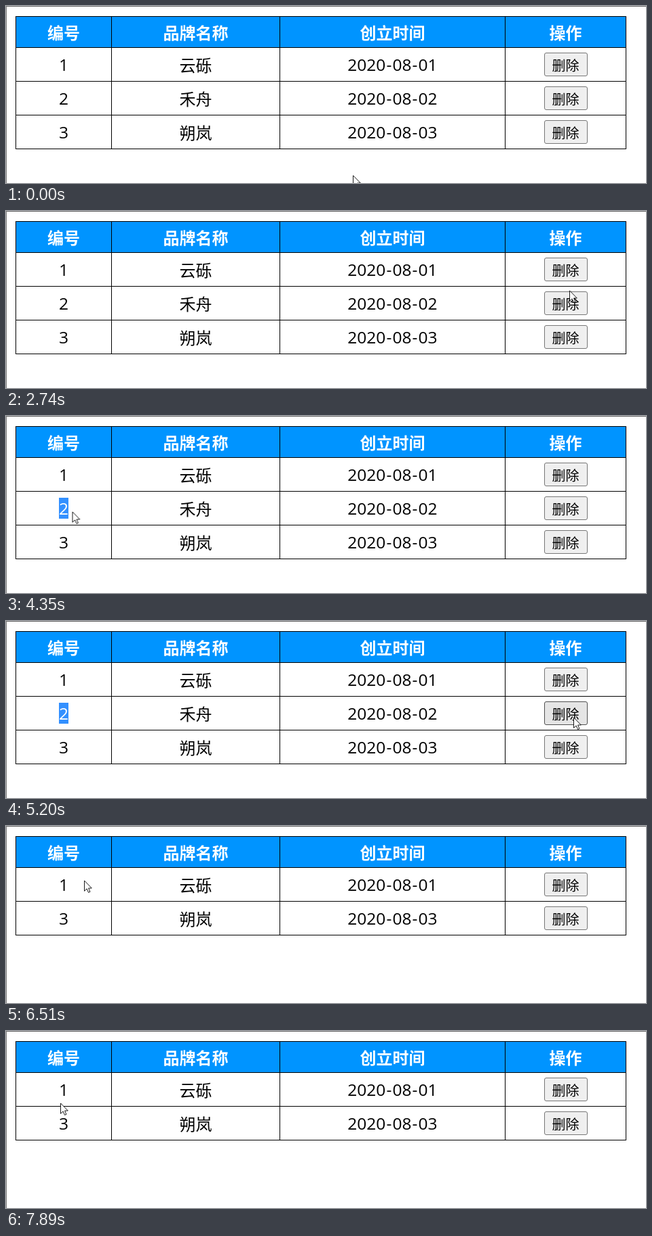
Recreate the animation shown at these times as an HTML page. Size 943x262 px, loop 8000 ms.

```html
<!DOCTYPE html>
<html lang="zh-CN">
<head>
<meta charset="utf-8">
<title>品牌列表</title>
<style>
  html, body { margin: 0; width: 100%; height: 100%; overflow: hidden; background: #fff; }
  svg { display: block; width: 943px; height: 262px; }
  text {
    font: 24px "Noto Sans CJK SC", "Noto Sans CJK", "Noto Sans", sans-serif;
    text-anchor: middle;
  }
  .num { font: 24.5px "Open Sans", "Noto Sans", sans-serif; }
  .head text { font-weight: 700; fill: #fff; }
  .label { font-size: 20px; }
  .grid { fill: none; stroke: #000; }
  .btn { fill: #efefef; stroke: #767676; }

  .anim { animation: 8s step-end infinite; }
  #hover1 { animation-name: hover1; }
  #hover2 { animation-name: hover2; }
  #pick { animation-name: pick; }
  #second, #slot3 { animation-name: removed; }
  #third { animation-name: shift; }
  #cursor { animation-name: pointer; }

  @keyframes hover1 {
    0%, 32.33% { fill: #efefef; stroke: #767676; }
    22% { fill: #e5e5e5; stroke: #4f4f4f; }
  }
  @keyframes hover2 {
    0%, 77.5% { fill: #efefef; stroke: #767676; }
    61.5% { fill: #e5e5e5; stroke: #4f4f4f; }
  }
  @keyframes pick {
    0%, 70%, 100% { opacity: 0; }
    52.9375% { opacity: 1; }
  }
  @keyframes removed {
    0% { opacity: 1; }
    70%, 100% { opacity: 0; }
  }
  @keyframes shift {
    0% { transform: translateY(0); }
    70%, 100% { transform: translateY(-50px); }
  }

  /* The pointer is sampled about every 135 ms while it travels. */
  @keyframes pointer {
    0% { transform: translate(511px, 250px); }
    15.25% { transform: translate(511px, 250px); animation-timing-function: steps(2, start); }
    18.625% { transform: translate(700px, 165px); animation-timing-function: steps(3, start); }
    23.6875% { transform: translate(838px, 81px); }
    30.5% { transform: translate(838px, 81px); animation-timing-function: steps(3, start); }
    36% { transform: translate(830px, 117px); animation-timing-function: steps(5, start); }
    44.25% { transform: translate(440px, 163px); animation-timing-function: steps(1, start); }
    46.125% { transform: translate(215px, 158px); animation-timing-function: steps(1, start); }
    47.75% { transform: translate(15px, 151px); animation-timing-function: steps(2, start); }
    51.25% { transform: translate(70px, 140px); animation-timing-function: steps(4, start); }
    58% { transform: translate(125px, 142px); }
    58.25% { transform: translate(125px, 142px); animation-timing-function: steps(3, start); }
    63.125% { transform: translate(850px, 145px); }
    65% { transform: translate(836px, 142px); }
    77.5% { transform: translate(836px, 142px); animation-timing-function: steps(2, start); }
    81.375% { transform: translate(300px, 105px); animation-timing-function: steps(1, start); }
    83.25% { transform: translate(115px, 80px); animation-timing-function: steps(2, start); }
    86.625% { transform: translate(56px, 62px); animation-timing-function: steps(3, start); }
    91.875% { transform: translate(130px, 21px); animation-timing-function: steps(2, start); }
    95.25% { transform: translate(55px, 70px); animation-timing-function: steps(2, start); }
    98.625%, 100% { transform: translate(80px, 106px); }
  }
</style>
</head>
<body>
<svg viewBox="0 0 943 262">
  <path d="M0 .5H943" stroke="#666"/>
  <path d="M.5 0V262" stroke="#777"/>

  <g class="head">
    <rect x="14" y="15" width="900" height="47" fill="#0094ff"/>
    <path class="grid" d="M14 15.5H914M14 61.5H914M14.5 15V62M155.5 15V62M403.5 15V62M735.5 15V62M913.5 15V62"/>
    <text x="85" y="49">编号</text>
    <text x="279.5" y="49">品牌名称</text>
    <text x="569.5" y="49">创立时间</text>
    <text x="824.5" y="49">操作</text>
  </g>

  <defs>
    <path id="cells" class="grid" d="M14 111.5H914M14.5 62V112M155.5 62V112M403.5 62V112M735.5 62V112M913.5 62V112"/>
    <text id="label" class="label" x="824.5" y="95.5">删除</text>
  </defs>

  <g>
    <use href="#cells"/>
    <rect id="hover1" class="btn anim" x="793.5" y="69.5" width="63" height="34" rx="2.5"/>
    <use href="#label"/>
  </g>
  <g transform="translate(0 50)">
    <use href="#cells"/>
    <rect id="hover2" class="btn anim" x="793.5" y="69.5" width="63" height="34" rx="2.5"/>
    <use href="#label"/>
  </g>
  <g id="slot3" class="anim">
    <g transform="translate(0 100)">
      <use href="#cells"/>
      <rect class="btn" x="793.5" y="69.5" width="63" height="34" rx="2.5"/>
      <use href="#label"/>
    </g>
  </g>

  <g>
    <text class="num" x="85" y="96">1</text>
    <text x="279.5" y="97">云砾</text>
    <text class="num" x="569.5" y="96">2020<tspan dx="1.1">-</tspan><tspan dx="1.1">08</tspan><tspan dx="1.1">-</tspan><tspan dx="1.1">01</tspan></text>
  </g>
  <g id="second" class="anim">
    <text class="num" x="85" y="146">2</text>
    <text x="279.5" y="147">禾舟</text>
    <text class="num" x="569.5" y="146">2020<tspan dx="1.1">-</tspan><tspan dx="1.1">08</tspan><tspan dx="1.1">-</tspan><tspan dx="1.1">02</tspan></text>
  </g>
  <g id="third" class="anim">
    <text class="num" x="85" y="196">3</text>
    <text x="279.5" y="197">朔岚</text>
    <text class="num" x="569.5" y="196">2020<tspan dx="1.1">-</tspan><tspan dx="1.1">08</tspan><tspan dx="1.1">-</tspan><tspan dx="1.1">03</tspan></text>
  </g>
  <g id="pick" class="anim">
    <rect x="78" y="121" width="14" height="31" fill="#3390ff"/>
    <text class="num" x="85" y="146" fill="#fff">2</text>
  </g>

  <g id="cursor" class="anim">
    <path d="M.5 .9V16.3L4.1 12.9L6.5 18.4L8.9 17.4L6.6 12H11.3Z" fill="#fff" stroke="#000" stroke-width=".9"/>
  </g>
</svg>
</body>
</html>
```
